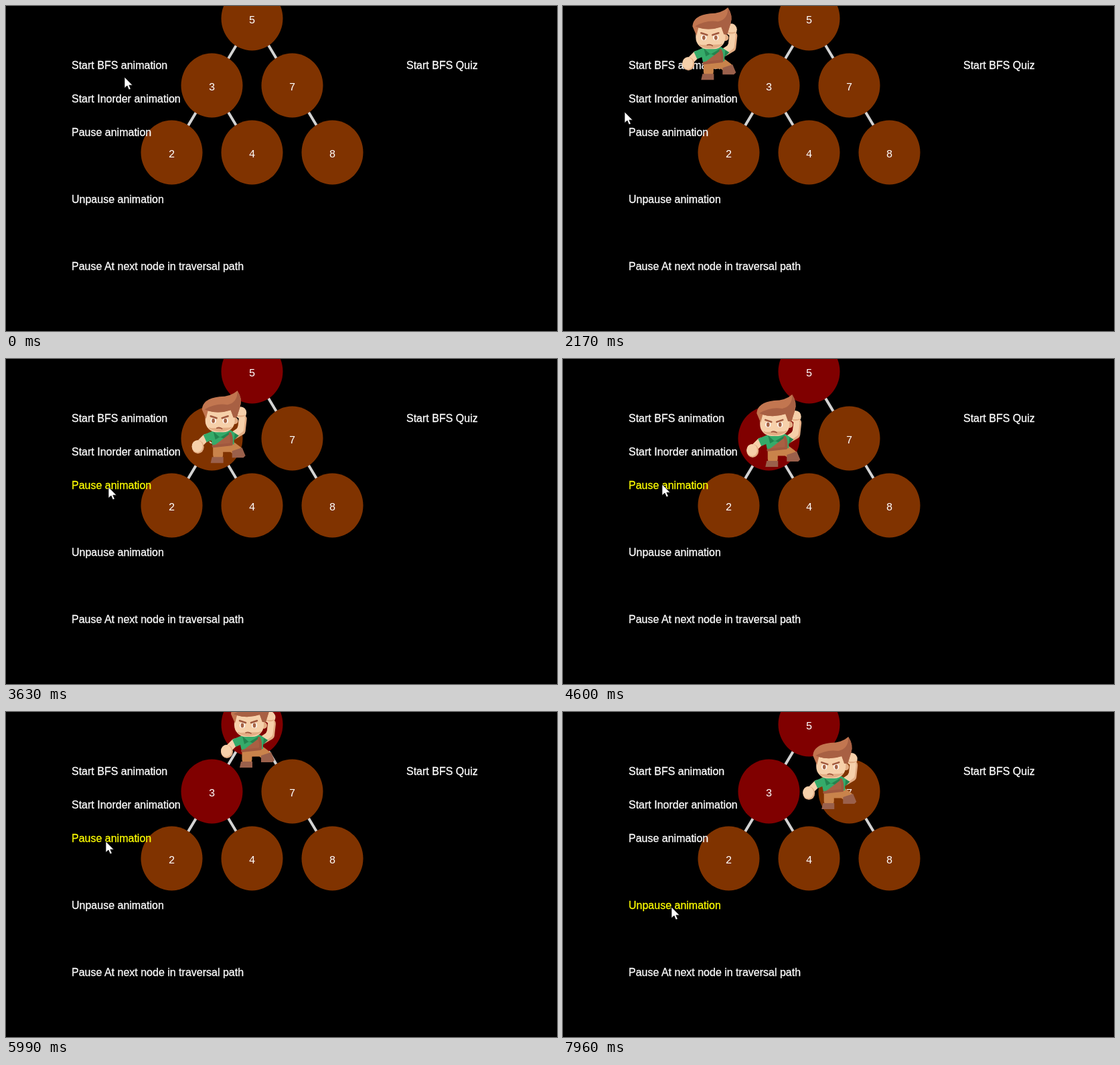
Recreate the animation shown at these times as an HTML page. Size 823x485 px, loop 7.99 s.

```html
<!DOCTYPE html>
<html lang="en">
<head>
<meta charset="utf-8">
<title>Tree traversal</title>
<style>
  html, body { margin: 0; width: 100%; height: 100%; overflow: hidden; background: #000; }
  svg { display: block; width: 823px; height: 485px; }
  text { fill: #fff; font-kerning: none; }
  .label { font: 16px "Liberation Sans", Arial, sans-serif; stroke: currentColor; stroke-width: .3; }
  .value { font: 16px "Liberation Mono", "Courier New", monospace; text-anchor: middle; }
  .edge { stroke: #d3d3d3; stroke-width: 4; }
  #hero { stroke-linecap: round; stroke-linejoin: round; }
  .line { fill: none; }
  .skin { fill: #f6d0aa; stroke: #f6d0aa; }
  .shade { fill: #e3ad84; stroke: #e3ad84; }
  .hair { fill: #c27650; }
  .dark { fill: #a86043; stroke: #a0583e; }
  .shirt { fill: #35ab6a; stroke: #35ab6a; }
  .fold { fill: #23844f; }
  .cloth { fill: #c9834b; stroke: #c9834b; }
  .boot { fill: #9a604b; }
  .skin, .shade, .dark, .shirt, .cloth { stroke-width: 0; }
</style>
</head>
<body>
<svg id="stage" viewBox="0 0 823 485">
  <g id="tree"></g>
  <g id="labels"></g>
  <g id="hero">
    <!-- arms -->
    <path class="line shade" style="stroke-width:12" d="M62 67L74 60L76 42"/>
    <path class="line skin" style="stroke-width:9" d="M62 66L73 58L75 42"/>
    <ellipse class="skin" cx="73" cy="33" rx="8.5" ry="9"/>
    <path class="line shade" style="stroke-width:1.5" d="M68 37Q72 40 79 37"/>
    <path class="line skin" style="stroke-width:11" d="M21 70L11 80"/>
    <ellipse class="shade" cx="9" cy="84" rx="9" ry="10"/>
    <ellipse class="skin" cx="8" cy="83" rx="8" ry="9"/>
    <!-- legs and boots -->
    <path class="line cloth" style="stroke-width:15" d="M39 82V96M40 84H60L68 90"/>
    <path class="boot" d="M30 99H47V108H28ZM60 90L75 85L80 97L77 100H60Z"/>
    <!-- shirt -->
    <path class="shirt" d="M17 66L34 59H58L70 67L63 73V80L31 83L29 74L22 77Z"/>
    <path class="fold" d="M32 61L42 70L57 61L53 74L42 69L35 73ZM64 64L70 67L63 74Z"/>
    <path class="line dark" style="stroke-width:4" d="M57 64Q60 70 59 80L32 83"/>
    <!-- head -->
    <circle class="shade" cx="64" cy="45" r="5"/>
    <rect class="skin" x="20" y="20" width="44" height="42" rx="17"/>
    <path class="line shade" style="stroke-width:2" d="M26 56Q43 65 59 55"/>
    <path class="hair" d="M21 42L15 28Q16 12 41 9Q58 9 68 0Q76 12 72 24L67 40H62L58 29Q40 35 24 30Z"/>
    <path class="dark" d="M19 28Q36 18 53 21Q68 18 68 1Q76 12 72 24L67 40H62L58 29Q40 35 24 30Z"/>
    <g id="eyes"></g>
    <path class="line dark" style="stroke-width:2.5" d="M28 38L37 41M45 41L54 38"/>
    <path class="line dark" style="stroke-width:1.6" d="M37 56Q41 54 45 57"/>
  </g>
  <path id="cursor" d="M0 0V16.5L4 13L6.6 19L9.3 17.8L6.8 12.2H12Z" fill="#fff" stroke="#000" stroke-width=".7"/>
</svg>
<script>
const LOOP = 7990, CLICK = 830, WALK = 918;
const $ = id => document.getElementById(id);

function add(parent, tag, attrs, text = "") {
  const el = document.createElementNS("http://www.w3.org/2000/svg", tag);
  for (const key in attrs) el.setAttribute(key, attrs[key]);
  el.textContent = text;
  parent.append(el);
  return el;
}

// Binary search tree: each child sits 60 px to its side and 100 px below.
const root = { value: 5, x: 367.5, y: 18.5 };
const nodes = [root];
function insert(value) {
  let parent, side, node = root;
  while (node) {
    parent = node;
    side = value < parent.value ? "left" : "right";
    node = parent[side];
  }
  const x = parent.x + (side === "left" ? -60 : 60);
  nodes.push(parent[side] = { value, x, y: parent.y + 100, parent });
}
[3, 7, 2, 4, 8].forEach(insert);

for (const { x, y, parent } of nodes.slice(1)) {
  add($("tree"), "line", { class: "edge", x1: parent.x + .5, y1: parent.y, x2: x + .5, y2: y });
}
for (const n of nodes) {
  n.disc = add($("tree"), "ellipse", { cx: n.x, cy: n.y, rx: 46, ry: 48 });
  add($("tree"), "text", { class: "value", x: n.x, y: n.y + 7.5 }, n.value);
}

const labels = [];
function addLabel(text, x, row) {
  const y = 88 + 50 * row;
  const el = add($("labels"), "text", { class: "label", x, y: y + 6 }, text);
  labels.push({ el, x, y, w: el.getComputedTextLength() });
}
["Start BFS animation", "Start Inorder animation", "Pause animation", ,
  "Unpause animation", , "Pause At next node in traversal path"
].forEach((text, row) => addLabel(text, 98, row));
addLabel("Start BFS Quiz", 598, 0);

for (const cx of [32, 50]) {
  add($("eyes"), "ellipse", { cx, cy: 45, rx: 4, ry: 4, fill: "#fff" });
  add($("eyes"), "ellipse", { cx, cy: 45, rx: 2.4, ry: 3.4, fill: "#a86445" });
}

// Each move glides from wherever the last one ended.
const move = (start, end, x, y) => ({ start, end, x, y });
const walkTo = (node, start) => move(start, start + WALK, node.x - 46.5, node.y - 43.5);
const hero = [
  move(0, 0, -50, 46),
  walkTo(root, 1606), walkTo(root.left, 2968), walkTo(root, 4398), walkTo(root.right, 7391)
];
const cursor = [
  move(0, 0, 177, 106),
  move(30, 730, 133, 92),
  move(1490, 1740, 107, 95),
  move(1740, 2260, 89, 171),
  move(2260, 2720, 131, 201),
  move(3100, 3500, 153, 191),
  move(3910, 4090, 148, 187),
  move(5960, 6540, 162, 291)
];

function at(moves, t) {
  let { x, y } = moves[0];
  for (const m of moves.slice(1)) {
    const k = Math.min(1, Math.max(0, (t - m.start) / (m.end - m.start)));
    x += (m.x - x) * k;
    y += (m.y - y) * k;
  }
  return [x, y];
}

const place = (el, x, y) => el.setAttribute("transform", `translate(${x} ${y})`);

function draw(t) {
  const visited = n => t >= (n === root ? hero[1].end : n === root.left ? hero[2].end : Infinity);
  for (const n of nodes) n.disc.setAttribute("fill", visited(n) ? "#800000" : "#803300");

  $("hero").style.display = t < CLICK ? "none" : "";
  place($("hero"), ...at(hero, t));

  const [x, y] = at(cursor, t).map(Math.round);
  place($("cursor"), x, y);
  for (const b of labels) {
    const over = x >= b.x && x <= b.x + b.w && Math.abs(y - b.y) < 10;
    b.el.style.fill = b.el.style.color = over ? "#ff0" : "#fff";
  }
}

const start = performance.now();
function tick() {
  draw((performance.now() - start) % LOOP);
  requestAnimationFrame(tick);
}
tick();
</script>
</body>
</html>
```
